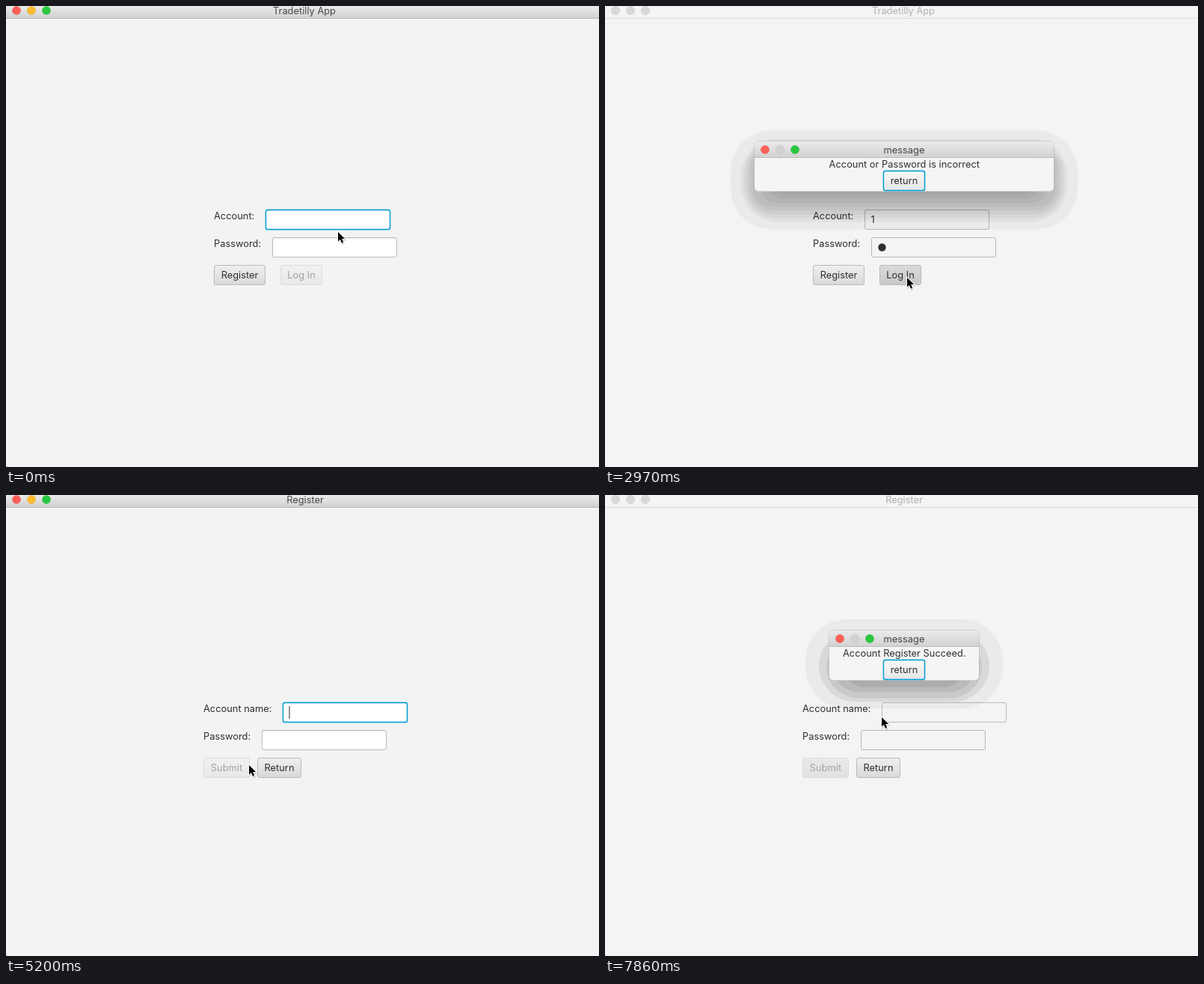
Recreate the animation shown at these times as an HTML page. Size 793x616 px, loop 8000 ms.

```html
<!DOCTYPE html>
<html lang="en">
<head>
<meta charset="utf-8">
<title>Login demo</title>
<style>
  html, body { margin: 0; width: 100%; height: 100%; overflow: hidden; background: #f3f3f3; }
  svg { display: block; width: 100vw; height: 100vh; }
  text { font: 12.85px Inter, Roboto, sans-serif; white-space: pre; }
</style>
</head>
<body>
<svg viewBox="0 0 793 616">
  <defs>
    <linearGradient id="bar" x2="0" y2="1"><stop stop-color="#ebebeb"/><stop offset="1" stop-color="#d2d2d2"/></linearGradient>
    <linearGradient id="button" x2="0" y2="1"><stop stop-color="#efefef"/><stop offset="1" stop-color="#d9d9d9"/></linearGradient>
    <linearGradient id="light" x2="0" y2="1"><stop stop-color="#f8f8f8"/><stop offset="1" stop-color="#e6e6e6"/></linearGradient>
    <linearGradient id="dark" x2="0" y2="1"><stop stop-color="#dadada"/><stop offset="1" stop-color="#c7c7c7"/></linearGradient>
    <linearGradient id="field" x2="0" y2="1"><stop stop-color="#ededed"/><stop offset=".14" stop-color="#fff"/></linearGradient>
  </defs>
  <g id="scene"></g>
</svg>
<script>
const DURATION = 8000;
const INK = '#2f2f2f', BLUE = '#079fd2';
const LIGHTS = ['#fc5f57', '#fdbc2f', '#29c840'];
const scene = document.getElementById('scene');

// [time, tip x, tip y]; the text cursor is centred on its point
const POINTER = [
  [0, 444, 302], [150, 463, 346], [300, 480, 381],
  [1040, 478, 366], [1190, 470, 346], [1340, 455, 329, 'text'],
  [2240, 404, 363],
  [3420, 400, 330], [3570, 393, 300], [3710, 394, 258], [3860, 395, 235],
  [4300, 345, 292], [4450, 300, 344], [4600, 313, 354], [4750, 325, 361],
  [6680, 322, 370], [6830, 319, 377], [6980, 318, 380], [7120, 308, 373], [7270, 300, 366],
  [7570, 312, 350], [7710, 348, 320], [7860, 370, 297]
];
// [time, visible]
const CARET = [
  [0, false], [150, true], [600, false], [750, true], [1190, false], [1490, true], [1640, false],
  [1790, true], [2090, false], [5200, true], [5640, false], [5790, true],
  [5940, false], [6090, true], [6530, false], [6830, false]
];
const WIDE_SHADOW = [[32, 51], [18, 41], [14, 36], [10, 31], [6, 26], [2, 21], [-6, 16], [-14, 10], [-24, 5]];
const NARROW_SHADOW = [[32, 38], [14, 29], [4, 24], [-4, 16], [-17, 9]];

const at = (keys, t) => keys.filter(key => key[0] <= t).pop();

const rect = (x, y, w, h, attrs) => `<rect x="${x}" y="${y}" width="${w}" height="${h}" ${attrs}/>`;

const circle = (x, y, r, attrs) => `<circle cx="${x}" cy="${y}" r="${r}" ${attrs}/>`;

const text = (x, y, label, fill = INK, anchor = 'start') =>
  `<text x="${x}" y="${y}" fill="${fill}" text-anchor="${anchor}">${label}</text>`;

const lights = (x, y, colors) => colors.map((color, i) =>
  circle(x + 20 * i, y, 5.75, `fill="${color}" stroke="#000" stroke-opacity=".1" stroke-width=".6"`)).join('');

const box = (x, y, w, fill, focused) =>
  (focused ? rect(x - .5, y - .5, w + 1, 28, `rx="3.5" fill="${BLUE}" fill-opacity=".35"`) : '') +
  rect(x + .5, y + .5, w - 1, 26, `rx="2.5" fill="${fill}" stroke="${focused ? BLUE : '#bababa'}" stroke-width="${focused ? 1.4 : 1}"`);

function field(x, y, { value, secret, focused, caret, inactive }) {
  let content = '';
  if (value) content = secret ? circle(x + 14.5, y + 13.5, 5.2, `fill="${INK}"`) : text(x + 8.5, y + 18, value);
  const caretX = x + 9 + (value ? (secret ? 13 : 6) : 0);
  return box(x, y, 167, inactive ? '#f4f4f4' : 'url(#field)', focused) + content +
    (focused && caret ? rect(caretX - .5, y + 5, 1, 17, `fill="${INK}"`) : '');
}

function button(x, y, w, label, { fill = 'button', focused, disabled } = {}) {
  return `<g opacity="${disabled ? .4 : 1}">` + box(x, y, w, `url(#${fill})`, focused) +
    text(x + w / 2, y + 18, label, INK, 'middle') + '</g>';
}

function titleBar(title, x, active) {
  return rect(0, 0, 793, 16, `fill="${active ? 'url(#bar)' : '#f4f4f4'}"`) +
    rect(0, 16, 793, 1, `fill="${active ? '#b5b5b5' : '#d9d9d9'}"`) +
    lights(14, 6, active ? LIGHTS : Array(3).fill('#d8d8d8')) +
    text(x, 11, title, active ? '#484848' : '#b1b1b1', 'middle');
}

function dialog(x, w, message, shadow, fill) {
  const y = 181, h = 66.5;
  const bands = shadow.map(([side, bottom], i) => {
    const top = 15 - (32 - side) * .8;
    return rect(x - side, y - top, w + 2 * side, h + top + bottom,
      `rx="${Math.max(24, 55 - 6 * i)}" fill-opacity="${i ? .38 / shadow.length : .04}"`);
  }).join('');
  return bands +
    rect(x - .5, y - .5, w + 1, h + 1, 'rx="5.5" fill="#b4b4b4"') +
    rect(x, y, w, h, 'rx="5" fill="#f5f5f5"') +
    `<path d="M${x} 202v-16q0-5 5-5h${w - 10}q5 0 5 5v16z" fill="url(#bar)"/>` +
    rect(x, 202, w, 1, 'fill="#bdbdbd"') +
    lights(x + 14, 192, [LIGHTS[0], '#d2d2d2', LIGHTS[2]]) +
    text(400, 197, 'message', '#454545', 'middle') +
    text(400.3, 216, message, INK, 'middle') +
    button(372, 220, 56, 'return', { fill, focused: true });
}

function loginPage(t) {
  const inactive = t >= 2970 && t < 4150;
  const caret = at(CARET, t)[1];
  const pressed = t >= 2530 && t < 4150;
  return titleBar('Tradetilly App', 399, !inactive) +
    text(278, 285, 'Account:') +
    field(347, 272, { value: t >= 750 ? '1' : '', focused: t < 1490, caret, inactive }) +
    text(278, 322, 'Password:') +
    field(356, 309, { value: t >= 2090 ? '1' : '', secret: true, focused: t >= 1490 && t < 2530, caret, inactive }) +
    button(278, 346, 69, 'Register') +
    button(367, 346, 56, 'Log In', {
      fill: pressed ? 'dark' : 'button', focused: t >= 2530 && !inactive, disabled: t < 2090
    }) +
    (inactive ? dialog(200, 400, 'Account or Password is incorrect', WIDE_SHADOW, t < 4010 ? 'light' : 'dark') : '');
}

function registerPage(t) {
  const inactive = t >= 7420;
  const caret = at(CARET, t)[1];
  const clicked = t >= 7270;
  return titleBar('Register', 400, !inactive) +
    text(264, 290, 'Account name:') +
    field(370, 277, { value: t >= 5640 && !inactive ? '1' : '', focused: t < 5940, caret, inactive }) +
    text(264, 327, 'Password:') +
    field(342, 314, { value: t >= 6240 && !inactive ? '1' : '', secret: true, focused: t >= 5940 && !clicked, caret, inactive }) +
    button(264, 351, 62, 'Submit', {
      fill: clicked ? 'dark' : 'button', focused: clicked && !inactive, disabled: t < 6240 || inactive
    }) +
    button(336, 351, 59, 'Return', { fill: t >= 6240 && !inactive ? 'light' : 'button' }) +
    (inactive ? dialog(300, 200, 'Account Register Succeed.', NARROW_SHADOW, 'light') : '');
}

function pointer(t) {
  const [, x, y, kind] = at(POINTER, t);
  const ibeam = 'M-3-7.5q3 0 3 2.5q0-2.5 3-2.5M0-5.5v11M-3 7.5q3 0 3-2.5q0 2.5 3 2.5M-1.8 2h3.6';
  const arrow = 'M0 0V12.6L2.9 9.9L5 14.7L7.2 13.8L5.2 9.1H9.2Z';
  const shape = kind
    ? `<path d="${ibeam}" fill="none" stroke="#fff" stroke-width="2.6"/><path d="${ibeam}" fill="none" stroke="#000" stroke-width="1.2"/>`
    : `<path d="${arrow}" transform="translate(.6 1.4)" fill-opacity=".2" stroke="#000" stroke-opacity=".12" stroke-width="2"/>
       <path d="${arrow}" stroke="#fff" stroke-width="1.8" paint-order="stroke"/>`;
  return `<g transform="translate(${x} ${y})">${shape}</g>`;
}

function render(t) {
  const dimmed = t >= 7420 || (t >= 2970 && t < 4150);
  return rect(0, 0, 793, 616, `fill="${dimmed ? '#f4f4f4' : '#f3f3f3'}"`) +
    '<path d="M0 613q0 3 3 3H0z" fill="#b0b0b0"/>' +
    (t < 5050 ? loginPage(t) : registerPage(t)) + pointer(t);
}

let drawn = '';
function tick() {
  const markup = render(performance.now() % DURATION);
  if (markup !== drawn) scene.innerHTML = drawn = markup;
  requestAnimationFrame(tick);
}
tick();
</script>
</body>
</html>
```
